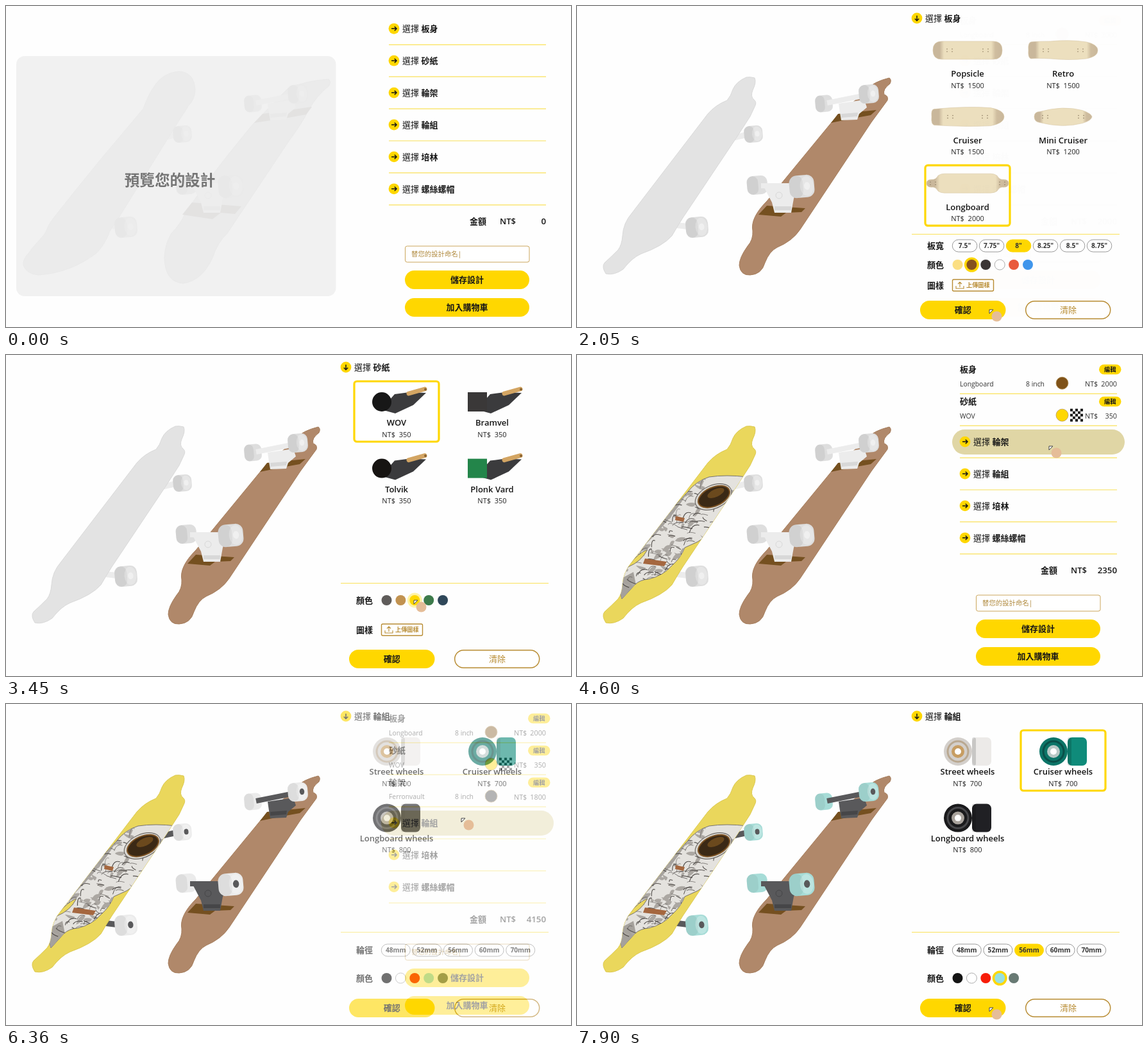
Animation, 881 px wide and 500 px high, one loop 8000 ms. Source, as an HTML page:

```html
<!DOCTYPE html>
<html lang="zh-Hant">
<head>
<meta charset="utf-8">
<style>
html, body { margin: 0; width: 100%; height: 100%; overflow: hidden; background: #fefefe; }
svg { display: block; width: 100vw; height: 100vh; }
text { font-family: "Open Sans", "Noto Sans CJK TC", "Noto Sans CJK JP", "Noto Sans CJK", sans-serif; white-space: pre; }
</style>
</head>
<body>
<svg viewBox="0 0 881 500">
  <defs>
    <linearGradient id="wood">
      <stop offset="0" stop-color="#c9b79b"/><stop offset=".1" stop-color="#c9b79b"/>
      <stop offset=".16" stop-color="#ecdfbe"/><stop offset=".84" stop-color="#ecdfbe"/>
      <stop offset=".9" stop-color="#cfbd9f"/><stop offset="1" stop-color="#c9b79b"/>
    </linearGradient>
    <filter id="shadow" x="-10%" y="-10%" width="120%" height="125%">
      <feDropShadow dx="0" dy="2" stdDeviation="2" flood-opacity=".3"/>
    </filter>
    <clipPath id="deckClip"><path id="deckClipPath"/></clipPath>
    <clipPath id="suitClip"><path id="suitClipPath"/></clipPath>
  </defs>
  <g id="scene"></g>
</svg>
<script>
const LOOP = 8000, FADE = 260;
const PAGE = '#fefefe', YELLOW = '#ffd700', LINE = '#fae158', GOLD = '#b88c33', INK = '#161616';
const byId = id => document.getElementById(id);

// Latest value in a list of [time, value] steps
const at = (t, steps) => steps.reduce((v, [time, next]) => t >= time ? next : v, steps[0][1]);

// Drawing helpers
const text = (x, y, s, size = 13, weight = 400, fill = INK, anchor = 'start') =>
  `<text x="${x}" y="${y + size * .37}" font-size="${size}" font-weight="${weight}" fill="${fill}" text-anchor="${anchor}">${s}</text>`;
const box = (x, y, w, h, r, fill, extra = '') =>
  `<rect x="${x}" y="${y}" width="${w}" height="${h}" rx="${r}" fill="${fill}" ${extra}/>`;
const path = (d, fill, extra = '') => `<path d="${d}" fill="${fill}" ${extra}/>`;
const disc = (x, y, r, fill, extra = '') => `<circle cx="${x}" cy="${y}" r="${r}" fill="${fill}" ${extra}/>`;
const oval = (x, y, rx, ry, fill, extra = '') =>
  `<ellipse cx="${x}" cy="${y}" rx="${rx}" ry="${ry}" fill="${fill}" ${extra}/>`;
const group = (attrs, inner) => `<g ${attrs}>${inner}</g>`;
const stroke = (color, width = 1) => `stroke="${color}" stroke-width="${width}"`;
const button = (x, y, w, label) => box(x, y, w, 29, 14.5, YELLOW) + text(x + w / 2, y + 14.5, label, 13, 700, INK, 'middle');
const rule = (x1, x2, y) => path(`M${x1} ${y}H${x2}`, 'none', stroke(LINE, 1.2));
const heading = (x, y, name, turn) =>
  disc(x, y, 8.4, YELLOW) +
  path('M-4 0H4M.8-3.2L4 0L.8 3.2', 'none', `${stroke(INK, 1.5)} transform="translate(${x} ${y}) rotate(${turn})"`) +
  text(x + 13, y, `選擇 <tspan font-weight="700">${name}</tspan>`);

// Boards
const SHAPES = {
  popsicle: {
    top: 'M270 102C252 103 238 113 230 127C222 138 218 150 214 160L150 236Q104 292 72 333Q66 341 62 352C56 362 44 372 36 384Q26 394 27 404Q32 417 50 419Q100 416 141 385Q152 374 159 358Q162 348 172 336L270 178Q280 163 284 156Q295 145 295 130Q293 103 270 102Z',
    base: 'M503 114Q470 116 440 128L386 183Q320 262 280 322Q272 340 258 354Q248 370 247 392Q248 430 276 432Q306 428 322 392Q330 368 345 354L440 212Q462 182 472 162Q484 140 504 124Q507 117 503 114Z',
    shade: 'M387 182L400 168L477 157L468 169L440 174ZM275 325L290 306L367 312L357 324L335 322L322 332Z'
  },
  longboard: {
    top: 'M264 111Q248 118 243 130Q240 140 234 147Q216 154 204 168L86 322Q72 338 71 358Q70 372 64 380Q54 390 43 400Q38 406 45 417Q58 420 72 410Q86 392 100 386Q134 374 148 358Q156 344 165 330L250 203L270 172L277 157Q281 150 276 146Q270 141 274 131Q280 119 277 112Q270 110 264 111Z',
    base: 'M487 112Q462 118 452 130L398 180L296 304Q270 330 274 350Q275 364 266 374Q253 392 253 404Q255 420 270 419Q288 418 293 400Q300 382 312 376Q336 366 348 348L358 333L459 181L484 147Q486 140 479 138Q476 130 488 121Q491 115 487 112Z',
    shade: 'M396 182L407 168L467 162L458 170L436 174ZM283 325L296 311L356 315L350 321L326 322L318 328Z'
  }
};
const SUIT = 'M172 214Q186 196 206 190Q232 186 266 190L242 228Q228 254 214 266Q204 282 188 291L168 300Q162 316 148 328Q134 344 112 349Q98 350 90 358L70 380L62 352L80 330Q100 322 110 303Q96 308 82 326L110 280Z';

function makeSuit() {
  let seed = 7;
  const rand = () => (seed = seed * 16807 % 2147483647) / 2147483647;
  let shades = '', creases = '';
  for (let i = 0; i < 170; i++) {
    const along = rand(), across = rand() * 2 - 1;
    const x = 208 - 135 * along + 34 * across, y = 200 + 160 * along + 24 * across;
    const dx = 5 + rand() * 12, dy = rand() * 22 - 14;
    const d = `M${x} ${y}q${dx / 2 - 3} ${dy - 3} ${dx} ${dy}`;
    if (i % 3) creases += path(d, 'none', stroke('#55514e', .5 + rand() * .8));
    else shades += path(d + `q-3 9 ${-dx} ${-dy}z`, '#aba7a2');
  }
  return path(SUIT, '#e4e2de', stroke('#77736f')) +
    group('clip-path="url(#suitClip)"',
      path('M172 214Q152 250 106 296L112 282ZM62 352L88 338L92 358L70 384Z', '#a5a19c') + shades + creases +
      path('M106 317L140 322L136 329L103 325ZM154 251L168 254L166 260L153 257Z', '#a5673f') +
      group('transform="rotate(-24 213 222)"',
        oval(213, 221, 30, 18, '#d8d5cf', stroke('#5a5653')) +
        oval(214, 221, 26, 14.5, '#3b2915', stroke('#7d5324', 2)) + oval(219, 217, 14, 6, '#6b491d')));
}
const suit = makeSuit();

const wheel = (x, y, w, h, near, color, hub) =>
  group(`transform="rotate(-5 ${x} ${y})"`,
    box(x - w / 2, y - h / 2, w, h, w * .3, color) +
    box(x - w / 2, y - h / 2, w * .55, h, w * .27, '#000', 'opacity=".06"') +
    (near
      ? oval(x + w * .2, y, w * .27, h * .44, '#fff', 'opacity=".25"') + oval(x + w * .21, y, w * .12, h * .17, hub)
      : ''));

function boards(t) {
  const shape = t < 1300 ? SHAPES.popsicle : SHAPES.longboard;
  const [top, edge] = at(t, [[0, ['#e3e3e3', '#d9d9d9']], [3560, ['#ead75c', '#dcc94f']]]);
  const [base, rim, shade] = at(t, [[0, ['#e0e0e0', '#d6d6d6', '#b9b5b2']], [1740, ['#b0886a', '#a57d5c', '#755020']]]);
  const [metal, dim, hub] = at(t, [[0, ['#ececec', '#d8d8d8', '#f0f0f0']], [5480, ['#59595b', '#464648', '#59595b']]]);
  const tyre = at(t, [[0, '#dedede'], [5480, '#ebebeb'], [7380, '#a6dcd7']]);
  byId('deckClipPath').setAttribute('d', shape.top);
  return path('M240 206L272 199M152 341L185 345', 'none', stroke(metal, 9)) +
    path(shape.top, top, stroke(edge)) +
    (t >= 3880 ? group('clip-path="url(#deckClip)"', suit) : '') +
    path(shape.base, base, stroke(rim)) + path(shape.shade, shade) +
    wheel(385, 152, 27, 26, 0, tyre) + wheel(281, 279, 32, 29, 0, tyre) +
    path('M408 152L448 146L452 158L440 168L437 177L412 178L410 166ZM292 283L346 281L338 300L334 322L308 322L304 306Z', metal) +
    path('M412 168L438 166L437 172L412 174ZM308 312L334 312L334 318L308 318Z', dim) +
    disc(315, 295, 5, 'none', stroke(dim)) +
    path('M390 151L450 139M287 280L345 280', 'none', stroke(metal, 8)) +
    wheel(275, 199.5, 29, 26, 1, tyre, hub) + wheel(187, 344.5, 35, 32, 1, tyre, hub) +
    wheel(455, 137, 31, 29, 1, tyre, hub) + wheel(350.5, 281, 39, 35, 1, tyre, hub);
}

// Pictures on the cards, centred on 0,0
const deckArt = (d, bolts) => path(d, 'url(#wood)', stroke('#d8c8a6', .6)) +
  [-bolts, bolts].map(x => [-4, 4].map(dx => [-2, 2].map(y => disc(x + dx, y, .8, '#8d7c60')).join('')).join('')).join('');
const gripArt = (color, round) =>
  path('M-3-8L20-11L46-10L26 9L-2 22L-24 16Z', '#3b3b3d') +
  path('M19-9L44-16', 'none', stroke('#d3a563', 7) + ' stroke-linecap="round"') + disc(45, -15.5, 2, '#8a6330') +
  (round ? disc(-23, 4, 15, color) : box(-38, -11, 30, 30, 0, color));
const truckArt = color => path('M-40 0H40', 'none', stroke('#999', 4)) +
  path('M-28-5H28L14 8L8 20H-8L-14 8Z', color) + disc(0, 6, 5, '#888');
const wheelArt = (side, face, rim, core) =>
  disc(-15, 5, 22, face) + disc(-15, 5, 16, 'none', stroke(rim, 3)) + disc(-15, 5, 10, core) + disc(-15, 5, 5, '#fff') +
  box(7, -17, 30, 44, 7, side) + box(7, -17, 6, 44, 3, '#000', 'opacity=".15"');

// Choice panels; card, size and color are [time, chosen index] steps
const PANELS = {
  deck: {
    title: '板身', card: [[0, 0], [1300, 4]], size: [[0, -1], [1540, 2]], color: [[0, -1], [1740, 1]],
    cards: [
      ['Popsicle', 1500, deckArt('M-40-14H40Q54-14 54 0Q54 14 40 14H-40Q-54 14-54 0Q-54-14-40-14Z', 28)],
      ['Retro', 1500, deckArt('M-50-13Q-40-14-20-14Q10-17 36-13Q54-9 54 0Q54 10 36 13Q10 16-20 13Q-40 12-50 13Q-55 12-54 0Q-55-12-50-13Z', 27)],
      ['Cruiser', 1500, deckArt('M-52-12Q0-17 36-14Q57-10 57 0Q57 10 36 14Q0 16-52 13Q-57 12-56 0Q-57-12-52-12Z', 27)],
      ['Mini Cruiser', 1200, deckArt('M-36-8Q0-18 30-10Q44-5 45 0Q44 6 30 10Q0 18-36 9Q-45 8-45 0Q-45-8-36-8Z', 28)],
      ['Longboard', 2000, deckArt('M-64 0Q-64-6-56-6Q-50-5-46-12Q-42-15-36-15H36Q42-15 46-12Q50-5 56-6Q64-6 64 0Q64 6 56 6Q50 5 46 12Q42 15 36 15H-36Q-42 15-46 12Q-50 5-56 6Q-64 6-64 0Z', 54)]
    ],
    sizes: ['板寬', 373, 38.5, 42, ['7.5"', '7.75"', '8"', '8.25"', '8.5"', '8.75"']],
    colors: [403, ['#fbdf83', '#85501d', '#3a3535', '#fff', '#e9593b', '#3f96ec']], upload: 435
  },
  grip: {
    title: '砂紙', card: [[0, -1], [3000, 0]], color: [[0, -1], [3560, 2]],
    cards: [
      ['WOV', 350, gripArt('#171717', true)], ['Bramvel', 350, gripArt('#3a3838', false)],
      ['Tolvik', 350, gripArt('#171412', true)], ['Plonk Vard', 350, gripArt('#23854a', false)]
    ],
    colors: [382, ['#5f5c5a', '#c19250', YELLOW, '#3d7b4b', '#2f4759']], upload: 428
  },
  truck: {
    title: '輪架', card: [[0, -1], [5080, 0]], size: [[0, -1], [5280, 1]], color: [[0, -1], [5480, 0]],
    cards: [['Ferronvault', 1800, truckArt('#555')], ['Quillmore', 1500, truckArt('#b5b5b5')]],
    sizes: ['寬度', 383, 38.5, 42, ['7.5"', '8"', '8.5"']],
    colors: [427, ['#4a4a4a', '#fff', '#c9c9c9', '#c19250']]
  },
  wheels: {
    title: '輪組', card: [[0, -1], [6760, 1]], size: [[0, -1], [7080, 2]], color: [[0, -1], [7380, 3]],
    cards: [
      ['Street wheels', 700, wheelArt('#eceae8', '#d3cfcb', '#b9a890', '#c79d62')],
      ['Cruiser wheels', 700, wheelArt('#0f8b7a', '#0c7568', '#0a4f48', '#b9c9c6')],
      ['Longboard wheels', 800, wheelArt('#202024', '#1a1a1c', '#47474a', '#a8a29c')]
    ],
    sizes: ['輪徑', 383, 45, 48.6, ['48mm', '52mm', '56mm', '60mm', '70mm']],
    colors: [427, ['#141414', '#fff', '#f71c08', '#96dfe0', '#687a74']]
  }
};

function panel(p, t, mouse) {
  let out = heading(530, 19, p.title, 90);
  const chosen = at(t, p.card);
  p.cards.forEach(([name, price, art], i) => {
    const x = 609 + i % 2 * 149, y = 69 + (i >> 1) * 103.6;
    const hovered = Math.abs(mouse.x - x) < 68 && Math.abs(mouse.y - y - 19) < 47;
    if (i === chosen) out += box(x - 66, y - 28, 132, 94, 4, '#fff', stroke(YELLOW, 3.2));
    else if (hovered) out += box(x - 68, y - 28, 136, 95, 5, '#fff', 'filter="url(#shadow)"');
    out += group(`transform="translate(${x} ${y})"`, art) +
      text(x, y + 36.5, name, 13, 600, INK, 'middle') + text(x, y + 54.5, `NT$\u00a0\u00a0${price}`, 11, 400, '#222', 'middle');
  });
  out += rule(522, 846, 355.5);

  if (p.sizes) {
    const [label, y, w, pitch, names] = p.sizes, picked = at(t, p.size);
    out += text(546, y + .5, label, 13, 700) + names.map((name, i) => {
      const x = 585.3 + i * pitch, on = i === picked;
      return box(x, y - 9, w, 19, 9.5, on ? YELLOW : '#fff', stroke(on ? YELLOW : '#999')) +
        text(x + w / 2, y + .5, name, 10.2, 700, '#333', 'middle');
    }).join('');
  }

  const [cy, colors] = p.colors, picked = at(t, p.color);
  out += text(546, cy, '顏色', 13, 700) + colors.map((c, i) => {
    const x = 593.5 + i * 21.9, near = Math.hypot(mouse.x - x, mouse.y - cy) < 10;
    const ring = i === picked ? YELLOW : near ? '#fff3a6' : '';
    return (ring ? disc(x, cy, 11.5, ring) : '') + disc(x, cy, 8, c, c === '#fff' ? stroke('#999', .8) : '');
  }).join('');

  if (p.upload) out += text(546, p.upload, '圖樣', 13, 700) +
    box(585.5, p.upload - 9, 64, 18, 2, '#fff', stroke(GOLD, 1.4)) +
    path(`M591 ${p.upload + 1}v4h12v-4M597 ${p.upload + 3}v-8m-3 3l3-3l3 3`, 'none', stroke(GOLD, 1.1)) +
    text(607, p.upload, '上傳圖樣', 9.2, 700, GOLD);
  return out + button(535, 459, 133.5, '確認') +
    box(699.7, 459.7, 132, 27.6, 13.8, '#fff', stroke(GOLD, 1.5)) + text(766, 473.5, '清除', 13, 500, GOLD, 'middle');
}

// Summary list
const ROWS = ['板身', '砂紙', '輪架', '輪組', '培林', '螺絲螺帽'];
const DONE = [
  { item: 'Longboard', size: '8 inch', color: '#7f5218', price: 2000 },
  { item: 'WOV', size: '', color: YELLOW, price: 350, pattern: true },
  { item: 'Ferronvault', size: '8 inch', color: '#444', price: 1800 }
];
const checker = (x, y) => box(x, y, 20, 20, 2, '#fff') +
  [...Array(25).keys()].filter(i => i % 2 === 0).map(i => box(x + i % 5 * 4, y + Math.floor(i / 5) * 4, 4, 4, 0, INK)).join('');

function menu(t, mouse) {
  const count = at(t, [[0, 0], [2050, 1], [4180, 2], [5780, 3]]);
  let total = 0, out = '';
  ROWS.forEach((name, i) => {
    const y = 35.3 + i * 49.9;
    if (i < count) {
      const d = DONE[i];
      total += d.price;
      out += text(597, y - 13, name, 13, 700) +
        box(814, y - 20.5, 34.5, 15.5, 7.7, YELLOW) + text(831.3, y - 12.7, '編輯', 9.2, 700, INK, 'middle') +
        text(597, y + 9.5, d.item, 10.4, 400, '#333') + text(700, y + 9.5, d.size, 10.4, 400, '#333') +
        disc(756.5, y + 8.5, 9.5, d.color, stroke('#b89a62', .8)) + (d.pattern ? checker(769, y - 1.5) : '') +
        text(792, y + 9.5, 'NT$', 10.8, 400, '#333') + text(842, y + 9.5, d.price, 10.8, 400, '#333', 'end');
    } else {
      const hovered = mouse.x > 585 && mouse.x < 854 && Math.abs(mouse.y - y) < 19.5;
      if (hovered) out += box(585, y - 19, 269, 39, 19.5, '#e0d6a5');
      out += heading(605, y, name, 0);
    }
    out += rule(597, 842, y + 25);
  });
  return out + text(723, 335.5, '金額', 13, 700) + text(770, 335.5, 'NT$', 13, 600) + text(842, 335.5, total, 13.3, 600, INK, 'end') +
    box(622.5, 374, 193.5, 25, 3, '#fff', stroke('#cba65c')) + text(632, 386.5, '替您的設計命名|', 10.4, 400, '#b08a3e') +
    button(622, 412, 194, '儲存設計') + button(622, 455, 194, '加入購物車');
}

const VIEWS = [[-FADE, 'menu'], [700, 'deck'], [2050, 'menu'], [2640, 'grip'], [4180, 'menu'], [4720, 'truck'], [5780, 'menu'], [6204, 'wheels']];

const TRACK = [
  [280, 890, 30], [500, 690, 36], [720, 690, 36], [1100, 645, 292], [1310, 645, 292], [1500, 688, 374], [1560, 688, 374],
  [1700, 615, 403], [1760, 615, 403], [1960, 643, 473], [2080, 643, 473], [2420, 677, 83], [2680, 677, 83],
  [2940, 615, 90], [3040, 615, 90], [3400, 636, 382], [3600, 636, 382], [3780, 618, 428], [3900, 618, 428],
  [4080, 643, 473], [4200, 643, 473], [4500, 736, 142], [4760, 736, 142], [5020, 610, 90], [5100, 610, 90],
  [5250, 646, 384], [5300, 646, 384], [5440, 594, 427], [5500, 594, 427], [5660, 640, 480], [5800, 640, 480],
  [6080, 710, 178], [6400, 710, 178], [6700, 760, 92], [6800, 760, 92], [7020, 705, 384], [7120, 705, 384],
  [7320, 659, 427], [7460, 659, 427], [7800, 643, 473], [LOOP, 643, 473]
];

function cursorAt(t) {
  const i = TRACK.findIndex(k => k[0] > t);
  if (i < 1) return { x: -99, y: -99 };
  const [t0, x0, y0] = TRACK[i - 1], [t1, x1, y1] = TRACK[i];
  const u = (t - t0) / (t1 - t0), e = u * u * (3 - 2 * u);
  return { x: x0 + (x1 - x0) * e, y: y0 + (y1 - y0) * e };
}

const pointer = ({ x, y }) => group(`transform="translate(${x} ${y})"`,
  path('M0 0H6L0 6Z', '#fff', stroke('#444')) + disc(11.5, 10.5, 8, '#e5bd98'));

const preview = opacity => group(`opacity="${opacity}"`,
  box(16, 78, 498.5, 374, 13, '#eee', 'opacity=".8"') + text(255.5, 271, '預覽您的設計', 23.6, 700, '#757575', 'middle'));

function draw(now) {
  const t = now % LOOP, mouse = cursorAt(t);
  const index = VIEWS.filter(v => v[0] <= t).length - 1;
  const fade = Math.min(1, (t - VIEWS[index][0]) / FADE);
  // Each view has an opaque page behind it, so fading in is a true cross-dissolve
  const view = (i, opacity) => group(`opacity="${opacity}"`, box(516, 0, 365, 500, 0, PAGE) +
    (VIEWS[i][1] === 'menu' ? menu(t, mouse) : panel(PANELS[VIEWS[i][1]], t, mouse)));
  const cover = Math.max(0, Math.min(1, 1 - (t - 700) / FADE));
  byId('scene').innerHTML = boards(t) + (cover ? preview(cover) : '') +
    (fade < 1 ? view(index - 1, 1) : '') + view(index, fade) + pointer(mouse);
}

byId('suitClipPath').setAttribute('d', SUIT);
const start = performance.now();
function tick() {
  draw(performance.now() - start);
  requestAnimationFrame(tick);
}
tick();
</script>
</body>
</html>
```
